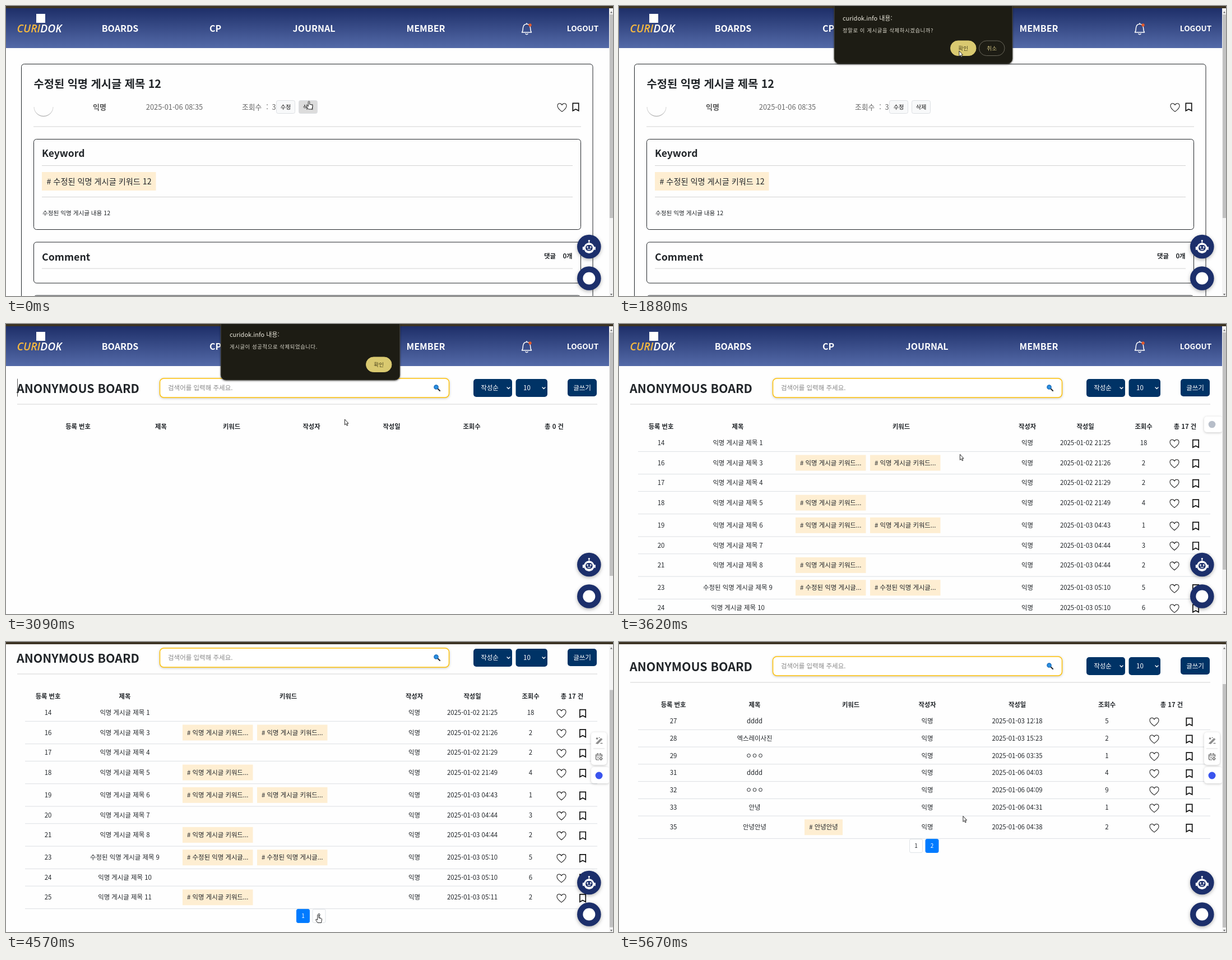
Write an HTML page that moves like this. It is 1083x517 px and loops after 6.26 s.

```html
<!DOCTYPE html>
<html lang="ko">
<head>
<meta charset="utf-8">
<title>Anonymous board</title>
<style>
html, body { margin: 0; width: 100%; height: 100%; overflow: hidden; background: #fefefe; }
svg { display: block; width: 100%; height: 100%; font-family: 'Noto Sans CJK KR', 'Noto Sans CJK', 'Noto Sans', sans-serif; }
text { white-space: pre; }
.soft { filter: drop-shadow(0 1px 2px rgba(0,0,0,.22)); }
.float { filter: drop-shadow(0 2px 3px rgba(0,0,0,.3)); }
.dialog { filter: drop-shadow(0 1px 1.5px rgba(0,0,0,.55)); }
</style>
</head>
<body>
<svg id="stage" viewBox="0 0 1083 517" preserveAspectRatio="none"></svg>
<script>
const LOOP = 6260, INK = '#212529', NAVY = '#1c2f6b', TAG = '#feeed2';
const stage = document.getElementById('stage');

// Text is placed by the vertical centre of its capitals.
const text = (x, cy, str, size, { fill = INK, weight = 400, anchor = 'middle', extra = '' } = {}) =>
  `<text x="${x}" y="${(cy + size * .37).toFixed(2)}" font-size="${size}" font-weight="${weight}" fill="${fill}" text-anchor="${anchor}" ${extra}>${str}</text>`;
const left = (x, cy, str, size, opt) => text(x, cy, str, size, { anchor: 'start', ...opt });
const rect = (x, y, w, h, fill, rx = 0, extra = '') =>
  `<rect x="${x}" y="${y}" width="${w}" height="${h}" rx="${rx}" fill="${fill}" ${extra}/>`;
const box = (x, y, w, h) => rect(x, y, w, h, '#fefefe', 5, `stroke="${INK}"`);
const circle = (x, y, r, fill) => `<circle cx="${x}" cy="${y}" r="${r}" fill="${fill}"/>`;
const rule = (x1, x2, y, color = '#d3d3d3') => `<path d="M${x1} ${y}H${x2}" stroke="${color}"/>`;
const line = (d, color, w) =>
  `<path d="${d}" fill="none" stroke="${color}" stroke-width="${w}" stroke-linecap="round" stroke-linejoin="round"/>`;
const at = (x, y, body) => `<g transform="translate(${x} ${y})">${body}</g>`;
const group = (id, body, extra = '') => `<g id="${id}" ${extra}>${body}</g>`;

const heart = (x, y) => at(x, y, line('M0 7.4C-4 4.2-8 1.6-8-2.8C-8-8-2-8.8 0-4.4C2-8.8 8-8 8-2.8C8 1.6 4 4.2 0 7.4Z', '#222', 1.1));
const bookmark = (x, y) => at(x, y, `<path d="M-5.2-6.6H5.2V6.8L0 4L-5.2 6.8Z" fill="none" stroke="#111" stroke-width="1.7"/>`);

function header() {
  const nav = [['BOARDS', 203.5], ['CP', 373.5], ['JOURNAL', 549.5], ['MEMBER', 749]];
  return rect(0, 4, 1076, 71, 'url(#sky)') +
    rect(54, 14, 16, 16, '#fff') +
    `<text x="19.5" y="46.5" font-family="'Open Sans', sans-serif" font-style="italic" font-weight="600" font-size="19.3" fill="#fff"><tspan fill="#f6b93f">CURI</tspan>DOK</text>` +
    nav.map(([s, x]) => text(x, 40.5, s, 16, { fill: '#fff', weight: 700 })).join('') +
    line('M920.5 47H937.5C935.3 44.5 936 41.5 935.5 38.5C935 34.5 932.5 32.2 929 32.2C925.5 32.2 923 34.5 922.5 38.5C922 41.5 922.7 44.5 920.5 47ZM927 49.5Q929 51.8 931 49.5M929 32V30.8', '#fff', 1.5) +
    circle(935, 34, 2.7, '#e2582b') +
    text(1029, 40.5, 'LOGOUT', 13.5, { fill: '#fff', weight: 700 });
}

function smallButton(id, x, label) {
  return rect(x, 168.5, 33, 23, '#f8f9fa', 3, `id="${id}" stroke="#dcdfe3"`) +
    text(x + 16.5, 180, label, 10.2, { fill: '#111', weight: 500 });
}

function post() {
  const gray = { fill: '#666' };
  return box(27.5, 103.5, 1019.5, 460) +
    left(49.5, 138.5, '수정된 익명 게시글 제목 12', 19.8, { weight: 700 }) +
    `<path d="M50 180A17 17 0 0 0 84 180A17 16 0 0 1 50 180Z" fill="#999" stroke="#ccc" stroke-width=".5"/>` +
    text(167, 180, '익명', 13, { fill: '#555', weight: 700 }) +
    text(300.5, 180, '2025-01-06 08:35', 12.8, gray) +
    left(421, 180, '조회수', 12.8, gray) + text(466, 180, ':', 12.8, gray) + text(478, 180, '3', 12.8, gray) +
    smallButton('edit', 482.5, '수정') + smallButton('remove', 522.5, '삭제') +
    heart(992, 181) + bookmark(1016.5, 180) + rule(49, 1026, 215) +
    box(49.5, 237.5, 976, 161) +
    left(64, 263, 'Keyword', 17.5, { weight: 700 }) + rule(64, 1011, 284.5) +
    rect(64, 296, 203.5, 33, TAG) + left(72.5, 313, '# 수정된 익명 게시글 키워드 12', 14.2) +
    rule(64, 1011, 340.5) + left(65, 369, '수정된 익명 게시글 내용 12', 10.6) +
    box(49.5, 421, 976, 73) +
    left(64, 447, 'Comment', 17.8, { weight: 700 }) +
    text(970.5, 446, '댓글', 11.4, { weight: 700 }) + text(1002, 446, '0개', 11.4, { weight: 700 }) +
    rule(64, 1011, 468) + box(49.5, 516, 976, 60);
}

function dropdown(x, w, label, cx) {
  return rect(x, 98, w, 32, '#003366', 5) + text(cx, 114, label, 11.5, { fill: '#fff', weight: 500 }) +
    line(`M${x + w - 9} 113l2.5 2.5l2.5-2.5`, '#fff', 1.4);
}

function boardTop() {
  return text(128.5, 115, 'ANONYMOUS BOARD', 21.4, { weight: 700 }) +
    rect(274.5, 97, 516, 34, '#fff', 7, 'stroke="#ffc107" stroke-width="1.5" class="soft"') +
    left(289, 114, '검색어를 입력해 주세요.', 11.5, { fill: '#888' }) +
    line('M770.5 115.5L774 119', '#30343b', 2.3) +
    `<circle cx="767.5" cy="112.5" r="3.7" fill="#2a8fe0" stroke="#1766b5" stroke-width="1.2"/>` +
    dropdown(834, 69, '작성순', 863) + dropdown(909.5, 56.5, '10', 929.5) +
    rect(1002, 98, 52, 31, '#003366', 5) + text(1028, 114, '글쓰기', 11.5, { fill: '#fff', weight: 500 }) +
    rule(20, 1055, 143);
}

function tableHead(cols, total) {
  return ['등록 번호', '제목', '키워드', '작성자', '작성일', '조회수', `총 ${total} 건`]
    .map((s, i) => text(cols[i], 183, s, 11.3, { weight: 700 })).join('');
}

// Row: number, title, date, views, then its keyword tags.
function table(cols, icons, tagX, tagW, rows, active) {
  let y = 196.6, out = tableHead(cols, 17);
  for (const [no, title, date, views, ...tags] of rows) {
    const h = tags.length ? 40.3 : 30.75, mid = y + h / 2;
    const cell = (col, s) => text(cols[col], mid, s, 11.4);
    out += cell(0, no) + cell(1, title) + cell(3, '익명') + cell(4, '2025-01-' + date) + cell(5, views) +
      tags.map((s, i) => rect(tagX + i * 133, mid - 14, tagW, 28, TAG) +
        text(tagX + i * 133 + tagW / 2, mid, '# ' + s, 11.4)).join('') +
      heart(icons[0], mid + 1.5) + bookmark(icons[1], mid + 1.2);
    y += h;
    out += rule(34, 1055, y, '#dcdfe3');
  }
  return out + [1, 2].map(n => {
    const x = 490 + n * 28.5, on = n === active;
    return rect(x, y + 1, 23, 24, on ? '#007bff' : '#fff', 2.5, `stroke="${on ? '#007bff' : '#dee2e6'}"`) +
      text(x + 11.5, y + 13, n, 10, { fill: on ? '#fff' : INK });
  }).join('');
}

function page1() {
  const name = '익명 게시글 제목 ', key = '익명 게시글 키워드...', edited = '수정된 익명 게시글...';
  return table([75, 212, 503.5, 728.5, 832, 936, 1010], [991, 1029], 315, 125.5, [
    [14, name + 1, '02 21:25', 18], [16, name + 3, '02 21:26', 2, key, key],
    [17, name + 4, '02 21:29', 2], [18, name + 5, '02 21:49', 4, key],
    [19, name + 6, '03 04:43', 1, key, key], [20, name + 7, '03 04:44', 3],
    [21, name + 8, '03 04:44', 2, key], [23, '수정된 ' + name + 9, '03 05:10', 5, edited, edited],
    [24, name + 10, '03 05:10', 6], [25, name + 11, '03 05:11', 2, key]
  ], 1);
}

function page2() {
  return table([97, 242, 413.5, 550, 710.5, 870.5, 986], [955, 1017.5], 331, 68, [
    [27, 'dddd', '03 12:18', 5], [28, '엑스레이사진', '03 15:23', 2], [29, 'ㅇㅇㅇ', '06 03:35', 1],
    [31, 'dddd', '06 04:03', 4], [32, 'ㅇㅇㅇ', '06 04:09', 9], [33, '안녕', '06 04:31', 1],
    [35, '안녕안녕', '06 04:38', 2, '안녕안녕']
  ], 2);
}

function dialog(x, w, message, cancel) {
  const pill = (px, label, fill, stroke, ink) =>
    rect(px, 62, 45.5, 26.5, fill, 13.2, `stroke="${stroke}"`) + text(px + 22.7, 75.5, label, 9.6, { fill: ink });
  const ok = px => pill(px, '확인', '#d9c970', '#d9c970', '#4a431c');
  return rect(x, -20, w, 123, '#1d1c14', 9, 'class="dialog" stroke="#55534a" stroke-width=".8"') +
    left(399, 22, 'curidok.info 내용:', 11, { fill: '#ebe8dc' }) +
    left(399, 43.5, message, 9.3, { fill: '#d9d6ca', extra: 'letter-spacing=".65"' }) +
    (cancel ? ok(591.5) + pill(642.5, '취소', 'none', '#69665a', '#d3c583') : ok(642.5));
}

function floats() {
  const robot = line('M0-11V-7', '#fff', 1.3) + circle(0, -10.5, 1.6, '#fff') +
    rect(-11.5, 0, 2.5, 6, '#fff', 1.2) + rect(9, 0, 2.5, 6, '#fff', 1.2) +
    `<ellipse cy="2.5" rx="9.3" ry="9.5" fill="#fff"/>` + rect(-6.3, -3, 12.6, 10.5, NAVY, 5) +
    circle(-2.8, 0.8, 1.5, '#fff') + circle(2.8, 0.8, 1.5, '#fff') + line('M-2.5 4Q0 6.2 2.5 4', '#fff', 1.2);
  const disc = `<g class="float">${circle(0, 0, 21.3, NAVY)}</g>`;
  return at(1040.3, 429, disc + robot) + at(1040.3, 485.5, disc + circle(0, 0, 11, '#fff'));
}

function sidebar() {
  const card = (y, w, h) => rect(1044, y, w, h, '#fff', 5, 'class="soft"');
  const wand = line('M-5 5L4-4M-2.8 5.5L5.5-2.8M-5-4h3M-3.5-5.5v3M3 4.5h3M0-5.5h1', '#555', 1.1);
  const note = line('M5.5-1V-3Q5.5-5 3.5-5H-3.5Q-5.5-5-5.5-3V3Q-5.5 5-3.5 5H0M-5.5-2H5.5M-2.5-6.5V-4M2.5-6.5V-4M-3 1.5H0', '#555', 1.1) +
    line('M3.5 .5L6 3L3.5 5.5L1 3Z', '#555', 1.1);
  return group('folded', card(165, 33, 28) + circle(1058, 179, 6.3, '#b7bec9')) +
    group('unfolded', card(161, 28, 58) + rule(1048, 1068, 190, '#ddd') + at(1058, 176, wand) +
      at(1058, 205, note) + card(223, 33, 29) + circle(1058, 238, 6.5, '#3a54ee'));
}

function cursor() {
  const style = 'fill="#fff" stroke="#111" stroke-width=".9" stroke-linejoin="round"';
  return group('arrow', `<path d="M.4 .4V10.4L2.7 8.3L4.2 11.8L5.8 11.1L4.3 7.7H7Z" ${style}/>`) +
    group('hand', `<path d="M-1.2 1Q0-.8 1.2 1V5.8L5.5 6.8Q6.8 7.3 6.5 9L5.5 14.5H-1L-4.2 9.8Q-4.5 8-2.8 8.4L-1.2 9.5Z" ${style}/>`);
}

stage.innerHTML =
  `<defs><linearGradient id="sky" x2="0" y2="1"><stop stop-color="#1e2f69"/><stop offset="1" stop-color="#546aa8"/></linearGradient></defs>` +
  rect(0, 0, 1083, 517, '#fefefe') +
  group('scroller', group('post', post()) +
    group('board', boardTop() +
      group('empty', tableHead([128.5, 276.5, 402.5, 545, 688, 831, 978], 0) + line('M20.5 98V129', '#555', 1)) +
      group('page1', page1()) + group('page2', page2())) + header()) +
  group('floats', floats()) + group('sidebar', sidebar()) +
  rect(1076, 4, 7, 513, '#f3f3f3') + rect(1077, 15, 6, 10, '#c1c1c1', 0, 'id="thumb"') +
  '<path d="M1078 12.5h4l-2-3zM1078 513h4l-2 3z" fill="#666"/>' +
  rect(0, 0, 1083, 4, '#3c3424') +
  group('ask', dialog(384, 318, '정말로 이 게시글을 삭제하시겠습니까?', true)) +
  group('done', dialog(383.2, 319.6, '게시글이 성공적으로 삭제되었습니다.', false), 'transform="translate(0 -3)"') +
  group('cursor', cursor());

const el = {};
stage.querySelectorAll('[id]').forEach(n => el[n.id] = n);

const ease = p => p * p * (3 - 2 * p);
// Keys are [time, ...values]; values ease from one key to the next.
function track(keys, t) {
  const i = keys.findIndex(k => k[0] > t);
  if (i < 0) return keys[keys.length - 1].slice(1);
  if (!i) return keys[0].slice(1);
  const a = keys[i - 1], b = keys[i], p = ease((t - a[0]) / (b[0] - a[0]));
  return a.slice(1).map((v, j) => v + (b[j + 1] - v) * p);
}
const POINTER = [[0, 540.5, 169.5], [1000, 540.5, 169.5], [1740, 606.5, 79.5], [2200, 606.5, 79.5],
  [2540, 604, 169.5], [3160, 604, 169.5], [3560, 608, 232], [4170, 608, 232], [4570, 557, 486],
  [4710, 557, 486], [5060, 638, 355], [5200, 638, 355], [5600, 613.5, 310]];
const SCROLL = [[3820, 0], [4030, 86]];
const LIFT = [[3860, 0], [3960, -16], [4030, -8], [4200, 0], [4915, 0], [4990, -14], [5060, -9], [5130, -8], [5400, 0]];
const ASK = [[780, 0], [930, 1], [1930, 1], [2070, 0]];
const DONE = [[2130, 0], [2270, 1], [3100, 1], [3240, 0]];

const show = (node, on) => node.setAttribute('display', on ? 'inline' : 'none');
const move = (node, x, y) => node.setAttribute('transform', `translate(${x} ${y})`);

function draw(t) {
  const view = t < 3090 ? 'post' : t < 3300 ? 'empty' : t < 4920 ? 'page1' : 'page2';
  for (const id of ['post', 'empty', 'page1', 'page2']) show(el[id], id === view);
  show(el.board, view !== 'post');
  const scroll = t < 3890 ? 0 : view === 'page2' ? 71 : track(SCROLL, t)[0];
  move(el.scroller, 0, -scroll);
  el.thumb.setAttribute('y', 15 + scroll * (view === 'page2' ? .845 : .82));
  el.thumb.setAttribute('height', { post: 363, empty: 434, page1: 423, page2: 434 }[view]);

  el.remove.setAttribute('fill', t < 1460 ? '#dcdcdc' : '#f8f9fa');
  el.ask.setAttribute('opacity', track(ASK, t)[0]);
  el.done.setAttribute('opacity', track(DONE, t)[0]);

  move(el.floats, 0, track(LIFT, t)[0]);
  show(el.sidebar, t >= 3300);
  show(el.folded, t < 3890);
  show(el.unfolded, t >= 3890);

  const hand = t < 860 || (t >= 4500 && t < 4760);
  show(el.hand, hand);
  show(el.arrow, !hand);
  move(el.cursor, ...track(POINTER, t));
}

const start = performance.now();
function tick() {
  draw((performance.now() - start) % LOOP);
  requestAnimationFrame(tick);
}
tick();
</script>
</body>
</html>
```
